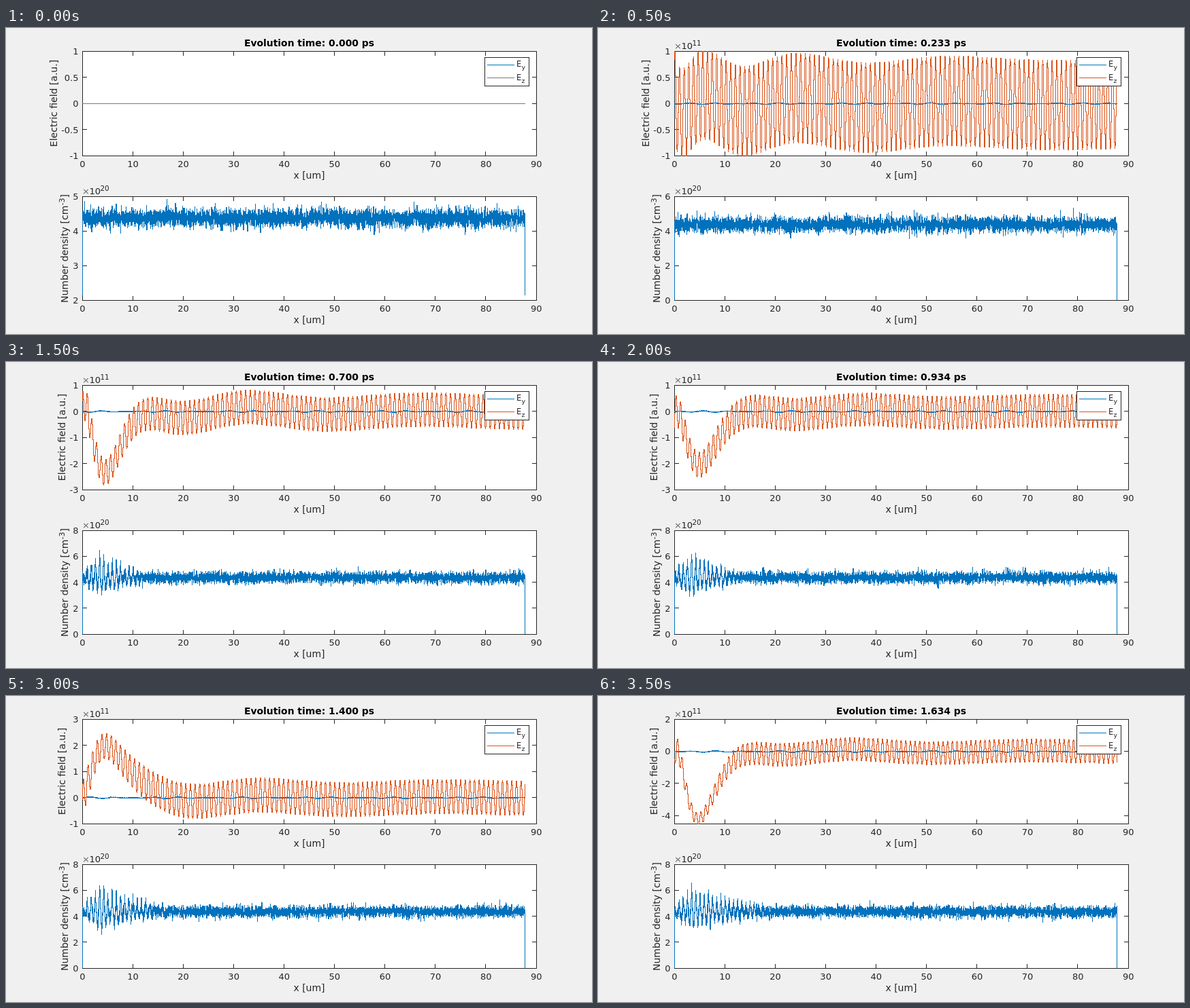
Animation, 861 px wide and 451 px high, one loop 4000 ms. Source, as an HTML page with a canvas:

```html
<!DOCTYPE html>
<html lang="en">
<head>
<meta charset="utf-8">
<title>Field evolution</title>
<style>
  html, body { margin: 0; width: 100%; height: 100%; overflow: hidden; background: #f0f0f0; }
  canvas { display: block; }
</style>
</head>
<body>
<canvas id="stage" width="861" height="451"></canvas>
<script>
const g = document.getElementById('stage').getContext('2d');
const STEP = 500, LEFT = 112, RIGHT = 779, END = 87.8;
const SCALE = (RIGHT - LEFT) / 90;
const BLUE = '#0072bd', ORANGE = '#d95319', GREY = '#7a7a7a', INK = '#262626';
const FONT = '"DejaVu Sans", sans-serif';

// axis: field [lo, hi, tick step]; dens: density [lo, hi, tick step]
// amp, crest: laser wave height and first crest (px)
// swing: plasma hump near the left wall; ripple, phase: slow wave behind it
// wave, reach: density bunching and how far it extends (um)
const states = [
  { axis: [-1, 1, .5], dens: [2, 5, 1], amp: 0, crest: 0, swing: 0, ripple: 0, phase: 0, wave: 0, reach: 1 },
  { axis: [-1, 1, .5], dens: [0, 6, 2], amp: .86, crest: 112.8, swing: 0, ripple: .2, phase: 0, wave: 0, reach: 1 },
  { axis: [-1.04, 1.157, .5], dens: [0, 6, 2], amp: .8, crest: 113.8, swing: 0, ripple: .4, phase: 1.64, wave: 1.5, reach: 12 },
  { axis: [-3, 1, 1], dens: [0, 8, 2], amp: .65, crest: 112.5, swing: -2, ripple: .38, phase: .8, wave: 2, reach: 13 },
  { axis: [-3, 1, 1], dens: [0, 8, 2], amp: .63, crest: 114.5, swing: -1.9, ripple: .2, phase: 1.2, wave: 2.1, reach: 14 },
  { axis: [-1, 4, 1], dens: [0, 8, 2], amp: .58, crest: 111.5, swing: 2.8, ripple: .3, phase: .3, wave: 2.3, reach: 14 },
  { axis: [-1, 3, 1], dens: [0, 8, 2], amp: .66, crest: 113.5, swing: 2.2, ripple: .25, phase: 1, wave: 2.1, reach: 17 },
  { axis: [-4.5, 2, 2], dens: [0, 8, 2], amp: .72, crest: 116.8, swing: -3.9, ripple: .35, phase: 1, wave: 1.9, reach: 20 }
];

function hump(x) {
  const u = x / 4.7;
  return (u * Math.exp(1 - u)) ** 2.6;
}

function fieldZ(s, x) {
  const h = hump(x);
  const mean = s.swing * h +
    s.ripple * Math.exp(-x / 40) * Math.cos(Math.PI * (Math.sqrt(x) - s.phase) / 1.25);
  const amp = s.amp * (1 - .12 * Math.abs(s.swing) * h);
  return mean + amp * Math.cos(2 * Math.PI * (LEFT + x * SCALE - s.crest) / 6.843);
}

function density(s, x) {
  const c = Math.cos(2 * Math.PI * (x - 2.6) / .83);
  const bunch = c > 0 ? .2 * c + .8 * c ** 3 : .6 * c;
  const size = s.wave * Math.min(1, x / 2.8) * Math.max(0, 1 - x / s.reach);
  return 4.38 + size * (1 + .2 * Math.sin(2.1 * x)) * bunch;
}

function gaussian(seed) {
  const rnd = () => {
    seed = seed + 0x6d2b79f5 | 0;
    let t = Math.imul(seed ^ seed >>> 15, 1 | seed);
    t = t + Math.imul(t ^ t >>> 7, 61 | t) ^ t;
    return ((t ^ t >>> 14) >>> 0) / 4294967296;
  };
  return () => Math.sqrt(-2 * Math.log(1 - rnd())) * Math.cos(2 * Math.PI * rnd());
}

function text(str, x, y, size, align = 'left', color = INK, weight = '') {
  g.font = `${weight} ${size}px ${FONT}`;
  g.textAlign = align;
  g.fillStyle = color;
  g.fillText(str, x, y);
}

function sideways(x, y, paint) {
  g.save();
  g.translate(x, y);
  g.rotate(-Math.PI / 2);
  paint();
  g.restore();
}

function box(x, y, w, h) {
  g.fillStyle = '#fff';
  g.fillRect(x, y, w, h);
  g.strokeStyle = INK;
  g.lineWidth = 1;
  g.strokeRect(x + .5, y + .5, w, h);
}

function axes(top, bottom, [lo, hi, step], power) {
  box(LEFT, top, RIGHT - LEFT, bottom - top);
  for (let v = 0; v <= 90; v += 10) {
    const x = Math.floor(LEFT + v * SCALE);
    g.fillStyle = INK;
    g.fillRect(x, top, 1, 7);
    g.fillRect(x, bottom - 6, 1, 7);
    text(v, LEFT + v * SCALE + .3, bottom + 17, 13, 'center');
  }
  for (let v = Math.ceil(lo / step) * step; v <= hi; v += step) {
    const y = bottom - (v - lo) / (hi - lo) * (bottom - top);
    g.fillStyle = INK;
    g.fillRect(LEFT, Math.floor(y), 7, 1);
    g.fillRect(RIGHT - 6, Math.floor(y), 7, 1);
    text(String(v), 106.5, Math.round(y) + 5, 13, 'right');
  }
  text('x [um]', 445.5, bottom + 34, 14, 'center');
  if (power) {
    text('×', 112, top - 3, 13, 'left', '#666');
    text('10', 122.5, top - 3, 13);
    text(power, 138.5, top - 8, 10.4);
  }
}

// Unsmoothed one-pixel line: each column spans the samples that fall in it.
function plot(top, bottom, [lo, hi], color, fn) {
  const PER = 8, last = Math.floor(END * SCALE);
  const toY = v => Math.round(bottom - (v - lo) / (hi - lo) * (bottom - top));
  let prev = toY(fn(0));
  g.fillStyle = color;
  for (let c = 0; c <= last; c++) {
    let a = prev, b = prev;
    for (let k = 0; k < PER; k++) {
      prev = toY(fn((c + k / PER) / SCALE, c === last && k === PER - 1));
      a = Math.min(a, prev);
      b = Math.max(b, prev);
    }
    a = Math.max(a, top);
    b = Math.min(b, bottom);
    g.fillRect(LEFT + c, a, 1, b - a + 1);
  }
}

function legendRow(sub, lineY, baseline, color) {
  g.fillStyle = color;
  g.fillRect(707, lineY, 40, 1);
  text('E', 750, baseline, 11.5);
  text(sub, 757.5, baseline + 4, 9.4);
}

function draw(n) {
  const s = states[n], rnd = gaussian(n * 977 + 5);
  const zColor = n ? ORANGE : GREY;
  const pixel = (s.axis[1] - s.axis[0]) / 154;

  g.fillStyle = '#f0f0f0';
  g.fillRect(0, 0, 861, 451);
  text(`Evolution time: ${(n * .2334).toFixed(3)} ps`, 445.5, 27, 13.9, 'center', '#000', 'bold');

  axes(34, 188, s.axis, n && '11');
  sideways(n < 3 ? 75 : 87, 111, () => text('Electric field [a.u.]', 0, 0, 14, 'center'));
  if (n) plot(34, 188, s.axis, BLUE, x =>
    pixel * (Math.sin(x * 1.25 + n) * Math.cos(x * .21 + n * 2) + .2 * rnd()));
  plot(34, 188, s.axis, zColor, x => fieldZ(s, x));
  box(703, 43, 65, 42);
  legendRow('y', 54, 57, BLUE);
  legendRow('z', 73, 77, zColor);

  axes(248, 401, s.dens, '20');
  sideways(91, 405, () => {
    text('Number density [cm', 0, 0, 14);
    text('-3', 143.5, -5, 11);
    text(']', 154.5, 0, 14);
  });
  const wall = n ? .05 : 2.15, noise = n ? .225 : .138;
  plot(248, 401, s.dens, BLUE, (x, atEnd) =>
    x === 0 || atEnd ? wall : density(s, x) + noise * rnd());
}

let shown = -1;
const start = performance.now();
function tick() {
  const n = Math.floor((performance.now() - start) / STEP) % states.length;
  if (n !== shown) draw(shown = n);
  requestAnimationFrame(tick);
}
tick();
</script>
</body>
</html>
```
